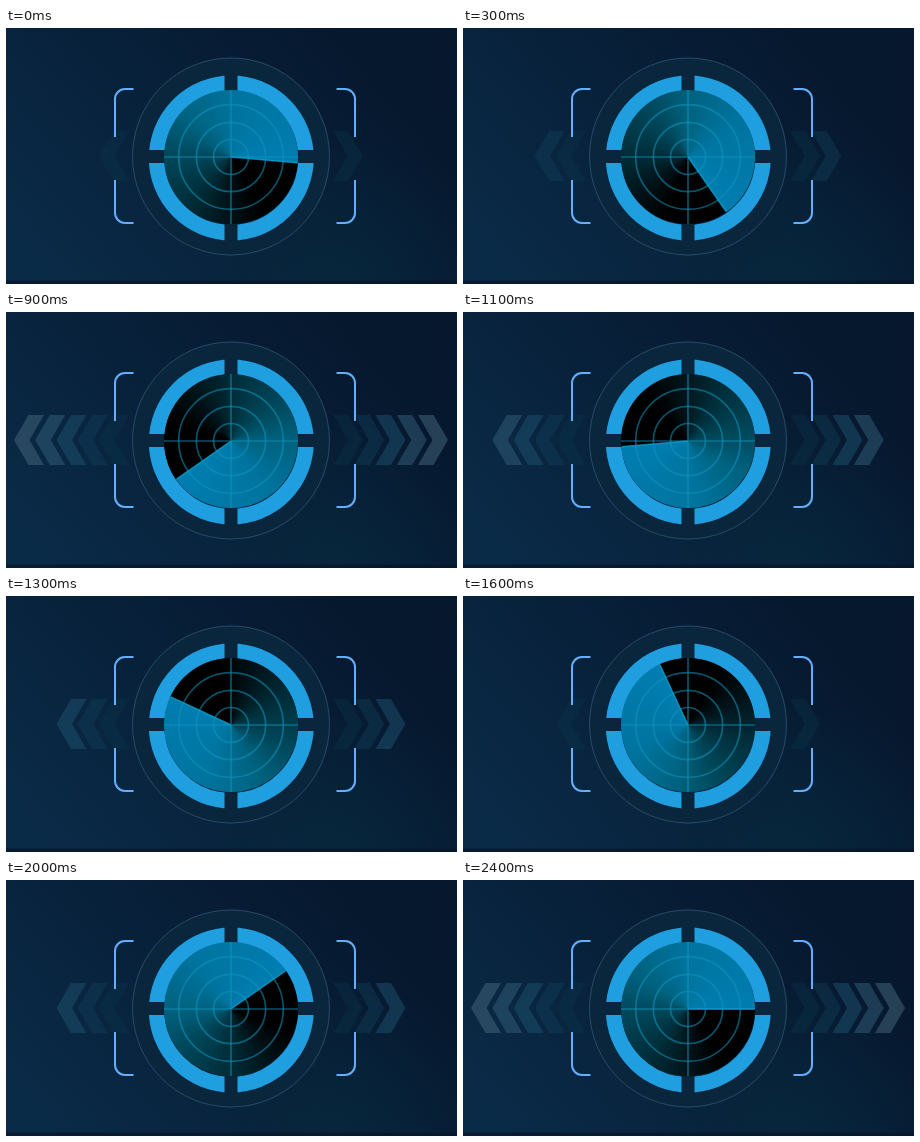
An HTML page for the animation above (2600 ms loop, 451 by 256 pixels).

```html
<!DOCTYPE html>
<html lang="en">
<head>
<meta charset="utf-8">
<title>Radar</title>
<style>
  html, body { margin: 0; width: 100%; height: 100%; overflow: hidden; background: #071c34; }
  svg { display: block; width: 100%; height: 100%; }
  #beam { width: 134px; height: 134px; border-radius: 50%; }
</style>
</head>
<body>
<svg viewBox="0 0 451 256" preserveAspectRatio="none">
  <defs>
    <linearGradient id="sky" gradientUnits="userSpaceOnUse" x1="40" y1="256" x2="330" y2="0">
      <stop offset="0" stop-color="#0a2b48"/>
      <stop offset=".5" stop-color="#08213b"/>
      <stop offset="1" stop-color="#06182e"/>
    </linearGradient>
    <radialGradient id="tint" gradientUnits="userSpaceOnUse" cx="330" cy="256" r="150">
      <stop offset="0" stop-color="#06283c" stop-opacity=".75"/>
      <stop offset="1" stop-color="#06283c" stop-opacity="0"/>
    </radialGradient>
    <mask id="gaps" maskUnits="userSpaceOnUse" x="130" y="35" width="190" height="190">
      <rect x="130" y="35" width="190" height="190" fill="#fff"/>
      <rect x="218.5" y="35" width="13" height="190"/>
      <rect x="130" y="122" width="190" height="13"/>
    </mask>
  </defs>

  <rect width="451" height="256" fill="url(#sky)"/>
  <rect width="451" height="256" fill="url(#tint)"/>
  <rect y="252.5" width="451" height="3.5" fill="#06142a" opacity=".7"/>

  <g id="arrows"></g>

  <g fill="none" stroke="#64aefa" stroke-width="2">
    <path id="bracket" d="M127.500 61H119a10 10 0 0 0-10 10V109M109 152V185a10 10 0 0 0 10 10H127.500"/>
    <use href="#bracket" transform="matrix(-1 0 0 1 458 0)"/>
  </g>

  <circle cx="225" cy="128.500" r="98.500" fill="#0a263d" stroke="#274b69"/>
  <circle cx="225.300" cy="130" r="74.700" fill="none" stroke="#1f9ee0" stroke-width="15.600" mask="url(#gaps)"/>

  <foreignObject x="158" y="62" width="134" height="134"><div id="beam"></div></foreignObject>
  <g fill="none" stroke="#1296bd" stroke-opacity=".55" stroke-width="1.700">
    <circle cx="225" cy="129" r="17.500"/>
    <circle cx="225" cy="129" r="34.700"/>
    <circle cx="225" cy="129" r="52.300"/>
    <path d="M158 129H292M225 62V196"/>
  </g>
  <path id="edge" d="M225 129H291.500" stroke="#0e9ac8" stroke-width="1.500" stroke-opacity=".85"/>
</svg>
<script>
const LOOP = 2600, STEP = 100;
const turns = [[0, 5], [300, 55], [900, 145], [1300, 205], [1600, 245], [2000, 325], [2200, 360], [LOOP, 360]];
const fade = 'black 0deg, black 55deg, #00141a 90deg, #002c37 125deg, #004a5e 180deg, ' +
  '#00627f 215deg, #00749f 270deg, #007db0 360deg';
const fills = ['#0d3a4c4d', '#12425a66', '#1f536e80', '#34607a80', '#47687f80'];

const beam = document.getElementById('beam');
const edge = document.getElementById('edge');
const arrows = document.getElementById('arrows');

function chevron(i, flip) {
  const path = document.createElementNS('http://www.w3.org/2000/svg', 'path');
  path.setAttribute('d', `M${93 - 21.25 * i} 128l14.500 -25h15.500l-14.500 25l14.500 25h-15.500z`);
  path.setAttribute('fill', fills[i]);
  if (flip) path.setAttribute('transform', 'matrix(-1 0 0 1 450 0)');
  arrows.append(path);
  return path;
}
const pairs = fills.map((_, i) => [chevron(i, false), chevron(i, true)]);

function angleAt(t) {
  const k = turns.findIndex(([end]) => end > t);
  const [t0, a0] = turns[k - 1], [t1, a1] = turns[k];
  return a0 + (a1 - a0) * (t - t0) / (t1 - t0);
}

function draw(time) {
  const t = Math.floor(time % LOOP / STEP) * STEP;
  const angle = angleAt(t);
  beam.style.background = `conic-gradient(from ${angle + 90}deg, ${fade})`;
  edge.setAttribute('transform', `rotate(${angle} 225 129)`);

  // The row grows to five and shrinks to one, 200 ms per arrow.
  const count = 5 - Math.abs(4 - Math.floor(t / 200) % 8);
  pairs.forEach((pair, i) => pair.forEach(p => p.style.display = i < count ? '' : 'none'));
}

let start;
function tick(now) {
  start ??= now;
  draw(now - start);
  requestAnimationFrame(tick);
}
draw(0);
requestAnimationFrame(tick);
</script>
</body>
</html>
```
